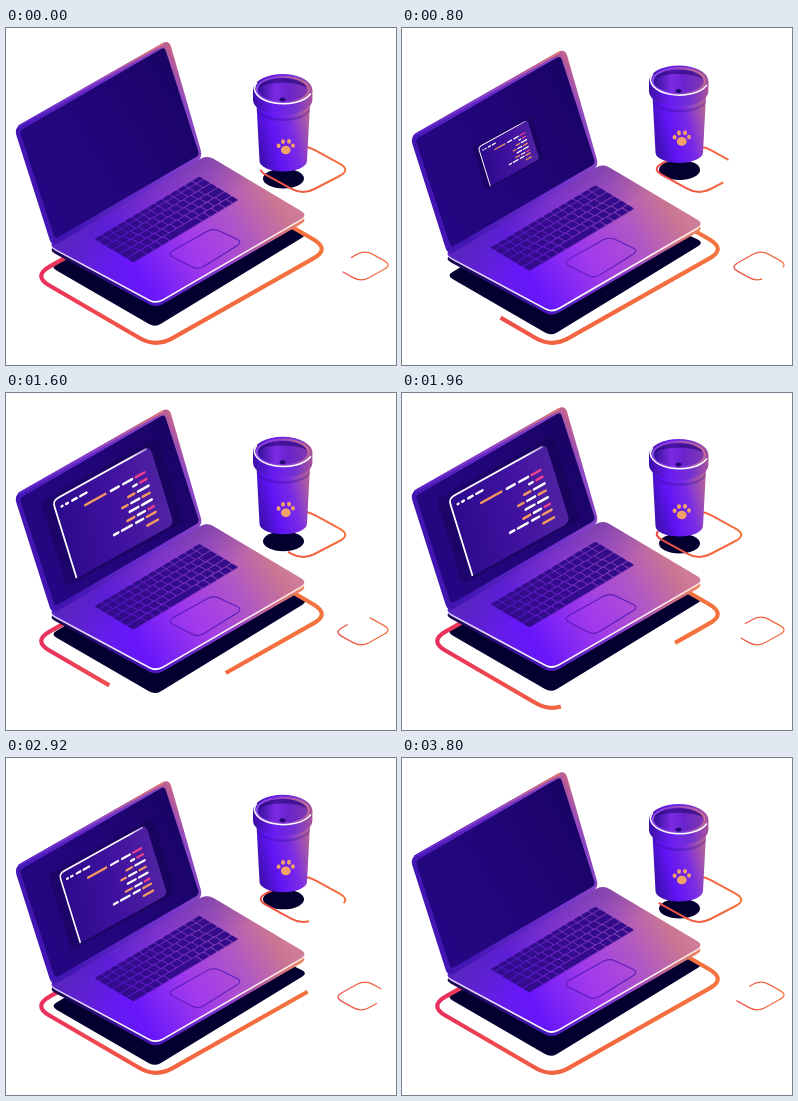
Write an HTML page that moves like this. It is 390x337 px and loops after 3.84 s.

```html
<!DOCTYPE html>
<html lang="en">
<head>
<meta charset="utf-8">
<title>Laptop and cup</title>
<style>
html, body { margin: 0; width: 100%; height: 100%; overflow: hidden; background: #fff; }
svg { display: block; width: 390px; height: 337px; }
</style>
</head>
<body>
<svg id="stage" viewBox="0 0 390 337" fill="none">
  <defs>
    <linearGradient id="gLine" gradientUnits="userSpaceOnUse" x1="35" y1="0" x2="316" y2="0">
      <stop offset="0" stop-color="#e92f5f"/><stop offset=".42" stop-color="#f2643f"/><stop offset="1" stop-color="#f4743f"/>
    </linearGradient>
    <linearGradient id="gLine2" gradientUnits="userSpaceOnUse" x1="254" y1="0" x2="340" y2="0">
      <stop offset="0" stop-color="#ee4b45"/><stop offset="1" stop-color="#f4743f"/>
    </linearGradient>
    <linearGradient id="gLine3" gradientUnits="userSpaceOnUse" x1="332" y1="0" x2="382" y2="0">
      <stop offset="0" stop-color="#ee4b45"/><stop offset="1" stop-color="#f4743f"/>
    </linearGradient>
    <linearGradient id="gLid" gradientUnits="userSpaceOnUse" x1="10" y1="100" x2="165" y2="15">
      <stop offset="0" stop-color="#4316b4"/><stop offset=".5" stop-color="#6a2bcb"/><stop offset=".9" stop-color="#8c48c4"/><stop offset="1" stop-color="#d06a80"/>
    </linearGradient>
    <linearGradient id="gLidTop" gradientUnits="userSpaceOnUse" x1="14" y1="0" x2="160" y2="0">
      <stop offset="0" stop-color="#5a22cc"/><stop offset=".5" stop-color="#9146c4"/><stop offset="1" stop-color="#e57a68"/>
    </linearGradient>
    <linearGradient id="gScreen" gradientUnits="userSpaceOnUse" x1="30" y1="160" x2="175" y2="75">
      <stop offset="0" stop-color="#250682"/><stop offset=".55" stop-color="#210578"/><stop offset="1" stop-color="#1b0468"/>
    </linearGradient>
    <linearGradient id="gTop" gradientUnits="userSpaceOnUse" x1="90" y1="260" x2="270" y2="155">
      <stop offset="0" stop-color="#6420e0"/><stop offset=".2" stop-color="#6716fb"/><stop offset=".5" stop-color="#a03aea"/><stop offset=".75" stop-color="#b158c4"/><stop offset=".95" stop-color="#c97692"/><stop offset="1" stop-color="#cf7c98"/>
    </linearGradient>
    <linearGradient id="gHinge" gradientUnits="userSpaceOnUse" x1="122" y1="172" x2="147" y2="215">
      <stop offset="0" stop-color="#4c2a9c" stop-opacity=".5"/><stop offset="1" stop-color="#4c2a9c" stop-opacity="0"/>
    </linearGradient>
    <linearGradient id="gSide" gradientUnits="userSpaceOnUse" x1="46" y1="0" x2="300" y2="0">
      <stop offset="0" stop-color="#150548"/><stop offset=".4" stop-color="#4b17c0"/><stop offset=".7" stop-color="#8b3bd0"/><stop offset="1" stop-color="#f08a5c"/>
    </linearGradient>
    <linearGradient id="gEdge" gradientUnits="userSpaceOnUse" x1="46" y1="0" x2="300" y2="0">
      <stop offset="0" stop-color="#d9c4ff"/><stop offset=".4" stop-color="#fff"/><stop offset="1" stop-color="#ffe9e2"/>
    </linearGradient>
    <linearGradient id="gPanel" gradientUnits="userSpaceOnUse" x1="0" y1="30" x2="111" y2="45">
      <stop offset="0" stop-color="#2c0a8c"/><stop offset=".55" stop-color="#40129f"/><stop offset="1" stop-color="#4f22a2"/>
    </linearGradient>
    <linearGradient id="gFrame" gradientUnits="userSpaceOnUse" x1="0" y1="0" x2="111" y2="0">
      <stop offset="0" stop-color="#fff"/><stop offset=".8" stop-color="#fff"/><stop offset="1" stop-color="#fff" stop-opacity=".4"/>
    </linearGradient>
    <linearGradient id="gBody" gradientUnits="userSpaceOnUse" x1="251" y1="112" x2="304" y2="98">
      <stop offset="0" stop-color="#3f10b4"/><stop offset=".3" stop-color="#6014f4"/><stop offset=".65" stop-color="#7a2be6"/><stop offset="1" stop-color="#b0609c"/>
    </linearGradient>
    <linearGradient id="gRim" gradientUnits="userSpaceOnUse" x1="247" y1="0" x2="307" y2="0">
      <stop offset="0" stop-color="#3b0fa6"/><stop offset=".35" stop-color="#6a1cf2"/><stop offset=".7" stop-color="#7431d2"/><stop offset="1" stop-color="#aa5598"/>
    </linearGradient>
    <linearGradient id="gLip" gradientUnits="userSpaceOnUse" x1="255" y1="75" x2="298" y2="50">
      <stop offset="0" stop-color="#8f4cf0"/><stop offset=".5" stop-color="#8a40d0"/><stop offset="1" stop-color="#c8708c"/>
    </linearGradient>
    <linearGradient id="gInner" gradientUnits="userSpaceOnUse" x1="252" y1="0" x2="302" y2="0">
      <stop offset="0" stop-color="#34109a"/><stop offset=".35" stop-color="#7c2ae4"/><stop offset=".6" stop-color="#6a24cc"/><stop offset="1" stop-color="#8038b0"/>
    </linearGradient>
  </defs>
</svg>
<script>
const NS = 'http://www.w3.org/2000/svg';
const stage = document.getElementById('stage');
const LOOP = 3840, BOB = 1920;
const INK = '#03002f', WHITE = '#fff', ORANGE = '#f49a62', PINK = '#ee3f8e';

function add(parent, tag, attrs = {}) {
  const el = document.createElementNS(NS, tag);
  for (const k in attrs) el.setAttribute(k, attrs[k]);
  return parent.appendChild(el);
}

// Closed polygon with softened corners; starts just after the first corner.
function soft(pts, r) {
  const n = pts.length;
  const toward = (p, q) => {
    const k = r / Math.hypot(q[0] - p[0], q[1] - p[1]);
    return [p[0] + (q[0] - p[0]) * k, p[1] + (q[1] - p[1]) * k];
  };
  let d = 'M' + toward(pts[0], pts[1]);
  for (let i = 1; i <= n; i++) {
    const p = pts[i % n];
    d += 'L' + toward(p, pts[i - 1]) + 'Q' + p + ' ' + toward(p, pts[(i + 1) % n]);
  }
  return d + 'Z';
}

const shape = (g, pts, r, attrs) => add(g, 'path', { d: soft(pts, r), ...attrs });

// Outline with a running gap of one fifth of its length.
function ring(pts, r, color, width, start, period) {
  const el = shape(stage, pts, r, {
    stroke: color, 'stroke-width': width, pathLength: 100, 'stroke-dasharray': '80 20'
  });
  return t => el.setAttribute('stroke-dashoffset', -(start + 100 * t / period));
}

const floor = add(stage, 'g');
const cupFloor = add(stage, 'g');
shape(floor, [[44.5, 239], [190, 152], [302, 206], [149, 299.5]], 7, { fill: INK });
add(cupFloor, 'ellipse', { cx: 277.5, cy: 150.5, rx: 20.5, ry: 10, fill: INK });

const rings = [
  ring([[27, 248], [150, 319.5], [324, 221], [201, 149.5]], 19, 'url(#gLine)', 4.2, -11.1, LOOP),
  ring([[249, 141], [298, 116], [345, 142], [297, 167]], 13, 'url(#gLine2)', 2, 15.3, BOB),
  ring([[328, 239], [355, 254], [386, 237], [359, 222]], 9, 'url(#gLine3)', 1.2, 0.7, BOB)
];

// Laptop
const laptop = add(stage, 'g');
const deck = [[42, 217], [201, 127], [302, 187], [150, 275]];
shape(laptop, deck.map(([x, y]) => [x, y + 5]), 8, { fill: 'url(#gSide)' });
shape(laptop, deck.map(([x, y]) => [x, y + 1.8]), 8, { fill: 'url(#gEdge)' });
shape(laptop, deck, 8, { fill: 'url(#gTop)' });
shape(laptop, deck, 8, { fill: 'url(#gHinge)' });

const keys = add(laptop, 'g', { transform: 'matrix(.86 -.512 .857 .516 88.5 211)', fill: '#320c8a' });
add(keys, 'rect', { x: 0, y: 1, width: 122, height: 45, rx: 2, opacity: .35 });
for (let row = 0; row < 6; row++) {
  const y = row ? 5.6 + (row - 1) * 8.1 : 0, h = row ? 7 : 4.6;
  for (let x = 0, i = 0; x < 121; i++) {
    let w = 8.75;
    if (row > 1 && i === 0) w += row * 1.6;
    if (row === 5 && i === 4) w = 38;
    if (x + w > 116) w = 123 - x;
    add(keys, 'rect', { x, y, width: w - 1.1, height: h, rx: 1 });
    x += w;
  }
}
shape(laptop, [[161, 226], [207, 200], [237, 214], [192, 242]], 7,
  { fill: '#a63ff0', 'fill-opacity': .25, stroke: '#5b1cb8', 'stroke-width': 1.1 });

shape(laptop, [[8, 100], [163, 11.5], [197, 130], [46, 219]], 8, { fill: 'url(#gLid)' });
add(laptop, 'path', { d: 'M13 98.2L157 16', stroke: 'url(#gLidTop)', 'stroke-width': 2, 'stroke-linecap': 'round' });
shape(laptop, [[13.5, 103], [158.5, 19], [193.5, 127], [49, 211]], 4, { fill: 'url(#gScreen)' });

// Code window, drawn flat and laid onto the screen
const panel = add(add(laptop, 'g', { transform: 'matrix(.885 -.49 .295 .955 45.5 105)' }), 'g');
add(panel, 'rect', { x: -11, y: -4, width: 132, height: 89, rx: 5, fill: '#14034f', opacity: .45 });
add(panel, 'rect', { width: 111, height: 82, rx: 6, fill: 'url(#gPanel)' });
add(panel, 'path', { d: 'M1 82V7Q1 1 7 1H107', stroke: 'url(#gFrame)', 'stroke-width': 1.8 });

// Each row: height, then dashes as [from, to, colour]
const rows = [
  [10.5, [8, 9, WHITE], [13, 15, WHITE], [20, 25, WHITE], [29, 36, WHITE]],
  [21, [31, 54, ORANGE], [60, 69, WHITE], [74, 84, WHITE], [88, 98, PINK]],
  [28, [83, 87, WHITE], [91, 98, PINK]],
  [35, [75, 82, ORANGE], [86, 98, WHITE]],
  [42, [66, 72, ORANGE], [76, 85, WHITE], [89, 97, ORANGE]],
  [49, [72, 82, WHITE], [86, 97, WHITE]],
  [56, [67, 75, ORANGE], [79, 87, WHITE], [91, 97, PINK]],
  [62, [50, 55, WHITE], [59, 70, WHITE], [75, 83, WHITE], [87, 97, ORANGE]],
  [70, [85, 97, ORANGE]]
];
for (const [y, ...parts] of rows)
  for (const [a, b, color] of parts)
    add(panel, 'path', { d: `M${a} ${y}H${b}`, stroke: color, 'stroke-width': 2.5, 'stroke-linecap': 'round' });

// Cup
const cup = add(stage, 'g');
add(cup, 'path', { d: 'M250.5 76L253.5 133A23.7 10.5 0 0 0 301 133L304 76Z', fill: 'url(#gBody)' });
add(cup, 'path', { d: 'M250.8 80A27 13 0 0 0 303.8 80L303.6 83A27 13 0 0 1 251 83Z', fill: '#2b0a8a', opacity: .3 });
add(cup, 'path', { d: 'M247 62V72A29.7 15 0 0 0 306.4 72V62Z', fill: 'url(#gRim)' });
add(cup, 'ellipse', { cx: 276.7, cy: 62, rx: 29.7, ry: 16, fill: 'url(#gRim)' });
add(cup, 'ellipse', { cx: 276.7, cy: 61.8, rx: 26, ry: 13, fill: 'url(#gInner)', stroke: 'url(#gLip)', 'stroke-width': 2 });
add(cup, 'path', { d: 'M252 60A24.8 11.5 0 0 1 301 60A26 8 0 0 0 252 60Z', fill: '#250873', opacity: .6 });
add(cup, 'ellipse', { cx: 276.5, cy: 71.5, rx: 3, ry: 2, fill: '#250873' });
add(cup, 'path', { d: 'M250.5 55A28.5 15 0 1 0 304.5 66', stroke: WHITE, 'stroke-width': 1.5, 'stroke-linecap': 'round' });
const pads = [[279.8, 122, 4.9, 4.3], [272.6, 117.8, 2, 2.2], [277, 113.6, 2, 2.4], [283, 113.4, 2, 2.4], [287, 117.6, 1.9, 2.2]];
for (const [cx, cy, rx, ry] of pads) add(cup, 'ellipse', { cx, cy, rx, ry, fill: '#f2a266' });

const ease = x => { x = Math.min(1, Math.max(0, x)); return x * x * (3 - 2 * x); };
const shift = (el, y) => el.setAttribute('transform', `translate(0 ${y.toFixed(2)})`);

function draw(t) {
  const bob = 4.6 * (1 - Math.cos(2 * Math.PI * t / BOB));
  shift(floor, bob);
  shift(laptop, bob);
  shift(cup, -bob);
  shift(cupFloor, -bob);
  rings.forEach(run => run(t));
  const open = ease((t - 600) / 400) * ease((3240 - t) / 400);
  panel.setAttribute('transform', `translate(55.5 40) scale(${open.toFixed(4)}) translate(-55.5 -40)`);
  panel.setAttribute('opacity', Math.min(1, open * 2));
}

const begin = performance.now();
function tick() {
  draw((performance.now() - begin) % LOOP);
  requestAnimationFrame(tick);
}
tick();
</script>
</body>
</html>
```
